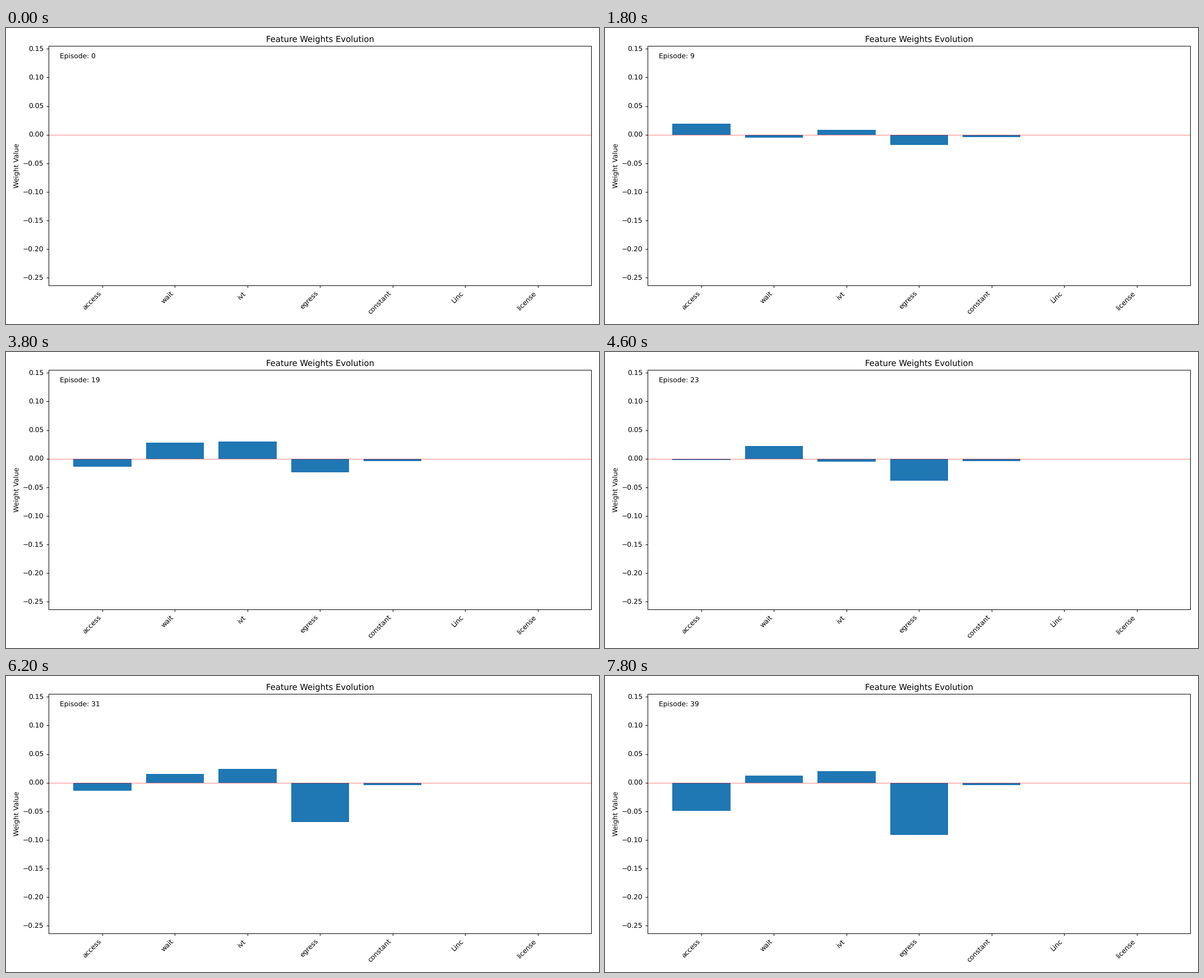
A matplotlib script for the animation above (8000 ms loop, 1058 by 529 pixels).

```python
import numpy as np
import matplotlib.pyplot as plt
from matplotlib.animation import FuncAnimation

WIDTH, HEIGHT = 1058, 529
DPI = 88.1667
EPISODES = 40
STEP_MS = 200


def ramp(n, start, end, power=1):
    """Rise from 0 to 1 between two episodes."""
    return np.clip((n - start) / (end - start), 0, 1) ** power


def smooth(n, start, end):
    t = ramp(n, start, end)
    return t * t * (3 - 2 * t)


def access(n):
    return (0.019 * smooth(n, 0, 9) - 0.0333 * smooth(n, 13, 19)
            + 0.0118 * smooth(n, 19, 23) - 0.047 * ramp(n, 23, 39, 2))


def wait(n):
    fade = 1 - np.exp(-max(n - 19, 0) / 8)
    return -0.0055 * smooth(n, 0, 9) + 0.034 * smooth(n, 13, 19) - 0.017 * fade


def in_vehicle(n):
    return (0.0305 * smooth(n, 4, 18) - 0.0355 * smooth(n, 19, 23)
            + 0.0295 * smooth(n, 23, 31) - 0.0041 * smooth(n, 31, 39))


def egress(n):
    early_dip = 0.0684 * np.sin(np.pi * ramp(n, 0, 6))
    return (-early_dip - 0.018 * smooth(n, 0, 6) - 0.0093 * smooth(n, 9, 13)
            + 0.004 * smooth(n, 13, 19) - 0.068 * ramp(n, 19, 37))


def constant(n):
    return -0.0038 * smooth(n, 0, 9)


def unused(n):
    return 0


WEIGHTS = {"access": access, "wait": wait, "ivt": in_vehicle,
           "egress": egress, "constant": constant,
           "Linc": unused, "license": unused}

plt.rcParams["font.family"] = "DejaVu Sans"
plt.rcParams["text.hinting"] = "none"

fig, ax = plt.subplots(figsize=(12, 6), dpi=DPI)
fig.subplots_adjust(left=76.3 / WIDTH, right=1044.3 / WIDTH,
                    bottom=69.3 / HEIGHT, top=497.3 / HEIGHT)

bars = ax.bar(list(WEIGHTS), np.zeros(len(WEIGHTS)))
ax.axhline(0, color="r", linewidth=0.9, alpha=0.45)
ax.set_xlim(-0.74, 6.74)
ax.set_ylim(-0.2631, 0.1555)
ax.set_title("Feature Weights Evolution", pad=5.2)
ax.set_ylabel("Weight Value")
plt.setp(ax.get_xticklabels(), rotation=45, ha="right")
label = ax.text(0.02, 0.95, "", transform=ax.transAxes)


def update(episode):
    for bar, weight in zip(bars, WEIGHTS.values()):
        bar.set_height(weight(episode))
    label.set_text(f"Episode: {episode}")
    return [*bars, label]


anim = FuncAnimation(fig, update, frames=EPISODES, interval=STEP_MS,
                     repeat=True, repeat_delay=0)
plt.show()
```
